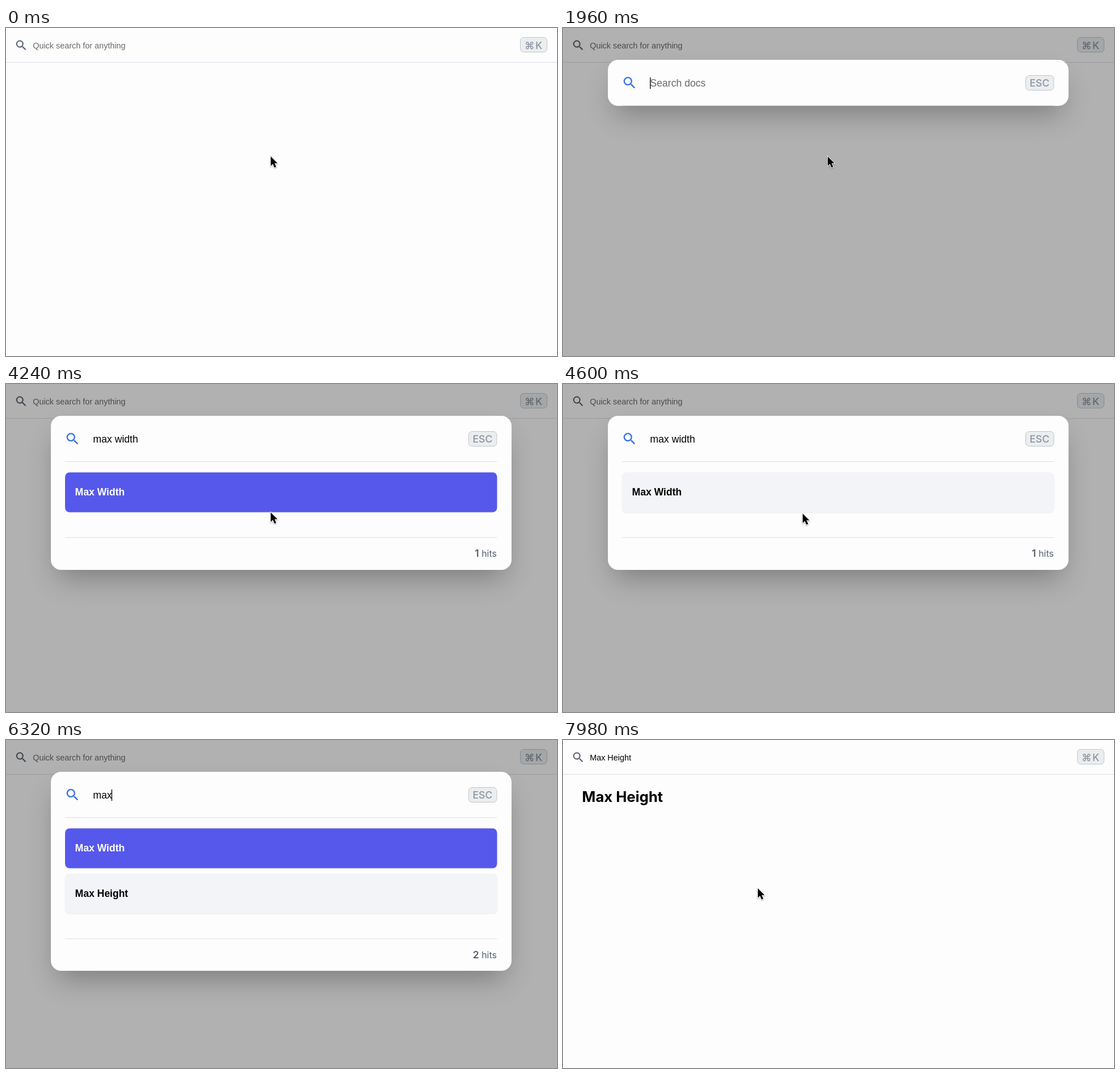
An HTML page for the animation above (8 s loop, 970x577 px).

```html
<!DOCTYPE html>
<html lang="en">
<head>
<meta charset="utf-8">
<title>Search dialog</title>
<style>
  html, body { margin: 0; width: 100%; height: 100%; overflow: hidden; background: #fdfdfd; }
  svg, #dialog, #box { position: absolute; left: 0; top: 0; }
  svg { width: 970px; height: 577px; }
  #dialog { width: 970px; height: 577px; background: rgba(0, 0, 0, .3); }
  #box { left: 78.5px; top: 56px; width: 811.5px; border-radius: 18px; background: #fdfdfd;
         box-shadow: 0 25px 50px -12px rgba(0, 0, 0, .3); }
  text { font: 17.6px "Liberation Sans", Arial, sans-serif; white-space: pre; }
  .small { font-size: 14.4px; }
  .inter { font-family: Inter, sans-serif; }
  .key text { font: 500 17.6px Inter, "DejaVu Sans", sans-serif; fill: #8b95a0; }
  .key rect { fill: #ebedef; stroke: #c1c7cd; }
  .hint { fill: #6a6a6a; }
  .line { stroke: #dcdce8; }
  .hit rect { fill: #f3f4f8; filter: drop-shadow(0 1px 1px rgba(60, 70, 110, .1)); }
  .hit text { font-weight: bold; font-size: 17.5px; }
  .hit.on rect { fill: #5558ea; }
  .hit.on text { fill: #fff; }
  #hits { fill: #56606e; }
  #arrow { filter: drop-shadow(0 1px 1px rgba(0, 0, 0, .35)); }
</style>
</head>
<body>
<svg>
  <defs>
    <path id="lens" d="M15.5 14h-.79l-.28-.27A6.47 6.47 0 0 0 16 9.5 6.5 6.5 0 1 0 9.5 16c1.61 0 3.09-.59 4.23-1.57l.27.28v.79l5 4.99L20.49 19l-4.99-5zm-6 0C7.01 14 5 11.99 5 9.5S7.01 5 9.5 5 14 7.01 14 9.5 11.99 14 9.5 14z"/>
  </defs>
  <use href="#lens" x="14.8" y="18.5" fill="#555e6b"/>
  <text id="field" class="small" x="47.2" y="35.7"></text>
  <g class="key">
    <rect x="905.5" y="16.5" width="47" height="26" rx="6"/>
    <text x="913" y="37">⌘</text><text x="932" y="37">K</text>
  </g>
  <path class="line" d="M0 60.5H970"/>
  <text id="title" class="inter" x="33.6" y="109" style="font-size:25.6px;font-weight:700">Max Height</text>
</svg>

<div id="dialog">
  <div id="box"></div>
  <svg>
    <use href="#lens" transform="translate(103.1 82.4) scale(1.17)" fill="#2f6fe4"/>
    <text id="query" x="153.3" y="103"></text>
    <rect id="caret" y="87" width="1.3" height="20"/>
    <g class="key">
      <rect x="814.5" y="83.5" width="49.5" height="26" rx="6"/>
      <text x="821.5" y="103">ESC</text>
    </g>
    <path class="line" d="M104 136.5H864.5"/>
    <g class="hit">
      <rect x="104" y="155.5" width="760.5" height="70" rx="8"/>
      <text x="121.6" y="196">Max Width</text>
    </g>
    <g class="hit" transform="translate(0 79.6)">
      <rect x="104" y="155.5" width="760.5" height="70" rx="8"/>
      <text x="121.6" y="196">Max Height</text>
    </g>
    <g id="foot">
      <path class="line" d="M104 190.5H864.5"/>
      <text id="hits" class="inter" x="864" y="224.5" text-anchor="end" style="font-size:16px"><tspan id="count" font-weight="600" font-size="17.6"></tspan> hits</text>
    </g>
  </svg>
</div>

<svg>
  <path id="arrow" d="M0 0V16.6L3.8 13 6.6 19.6 9.6 18.3 6.8 11.8H11.8Z" stroke="#fff" stroke-width="1.8" paint-order="stroke"/>
</svg>

<script>
const LOOP = 8000, PHRASE = "max width", ROW = 79.6;
const $ = id => document.getElementById(id);
const rows = document.querySelectorAll(".hit");

const typed = [2400, 2560, 2720, 2880, 3020, 3140, 3280, 3460, 3640];
const erased = [5240, 5420, 5600, 5760, 6040, 6220];
const caretOff = [[1440, 1940], [4140, 4640], [5140, 5240], [6650, 7060], [7510, LOOP]];
const hidden = [[2400, 4200], [5240, 7040]];
const path = [[0, 466, 226], [4280, 466, 226], [4600, 422, 228], [5000, 398, 200],
              [7040, 398, 200], [7240, 363, 233], [7440, 343, 261], [LOOP, 343, 261]];

const within = (spans, t) => spans.some(([a, b]) => t >= a && t < b);
const passed = (times, t) => times.filter(x => t >= x).length;
const ramp = (t, a, b) => Math.min(1, Math.max(0, (t - a) / (b - a)));
const show = (el, on) => el.style.display = on ? "" : "none";

function pointer(t) {
  const i = path.findIndex(p => p[0] > t);
  const [a, x, y] = path[i - 1], [b, u, v] = path[i];
  const k = ramp(t, a, b);
  return [x + (u - x) * k, y + (v - y) * k];
}

function draw(t) {
  const [x, y] = pointer(t);
  const done = t >= 7820;
  $("arrow").setAttribute("transform", `translate(${x} ${y})`);
  show($("arrow"), !within(hidden, t));

  $("field").textContent = done ? "Max Height" : "Quick search for anything";
  $("field").classList.toggle("hint", !done);
  show($("title"), done);

  $("dialog").style.opacity = ramp(t, 740, 920) * (1 - ramp(t, 7820, 7960));

  const text = PHRASE.slice(0, passed(typed, t) - passed(erased, t));
  const query = $("query");
  query.textContent = text || "Search docs";
  query.classList.toggle("hint", !text);
  $("caret").setAttribute("x", 153 + (text ? query.getComputedTextLength() - .6 : 0));
  show($("caret"), !within(caretOff, t));

  const hits = passed([3900, 6260], t);
  rows.forEach((row, i) => {
    const top = 156 + i * ROW;
    show(row, i < hits);
    row.classList.toggle("on", y >= top && y < top + 71);
  });
  show($("foot"), hits);
  $("foot").setAttribute("transform", `translate(0 ${hits * ROW})`);
  $("count").textContent = hits;
  $("box").style.height = (hits ? 191.2 + hits * ROW : 81) + "px";
}

function tick() {
  draw(performance.now() % LOOP);
  requestAnimationFrame(tick);
}
tick();
</script>
</body>
</html>
```
